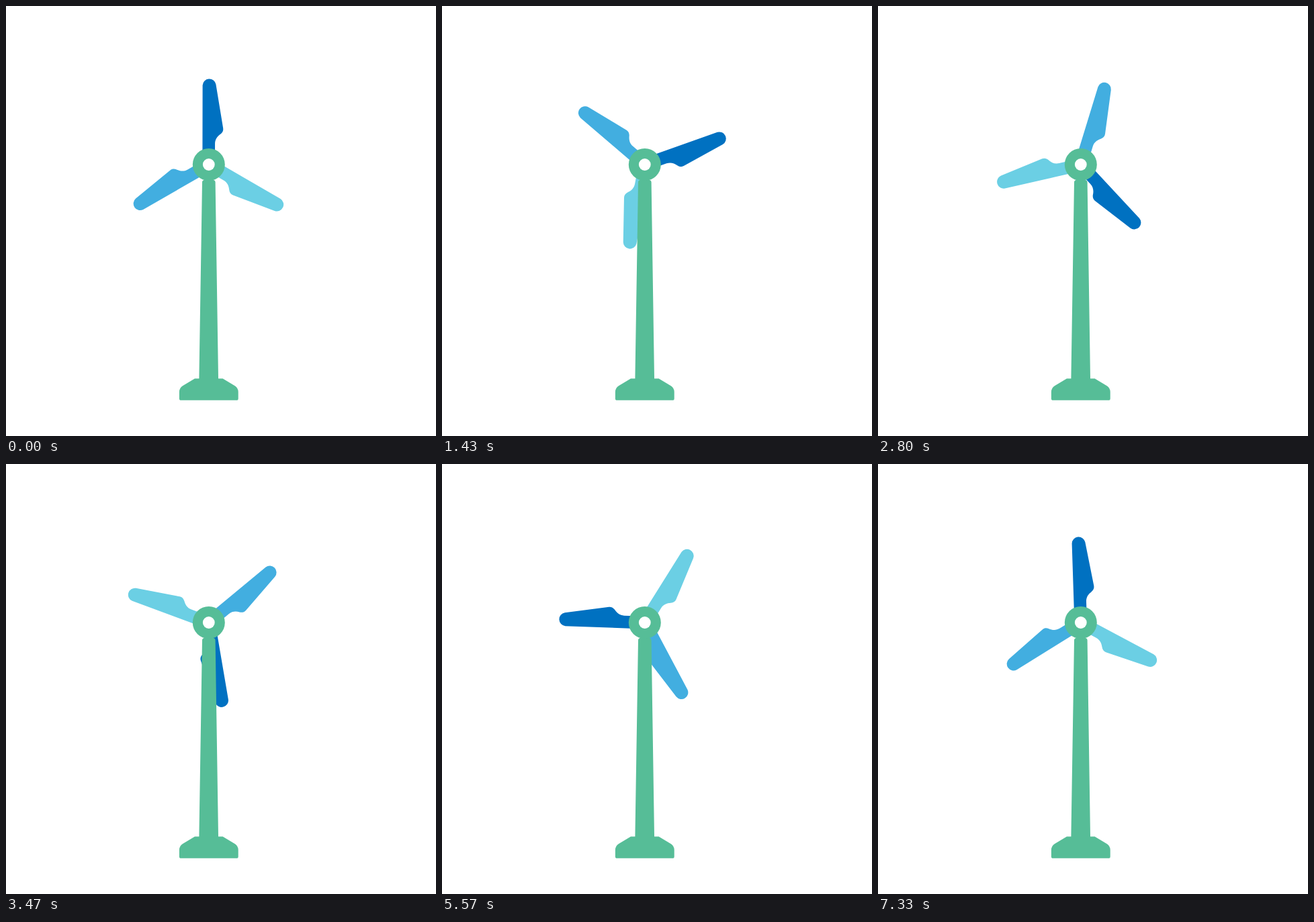
Write an HTML page that moves like this. It is 640 px wide and 640 px high and loops after 7360 ms.

```html
<!DOCTYPE html>
<html lang="en">
<head>
<meta charset="utf-8">
<title>Wind turbine</title>
<style>
  html, body { margin: 0; width: 100%; height: 100%; overflow: hidden; background: #fff; }
  svg { display: block; width: 100%; height: 100%; }
</style>
</head>
<body>
<svg viewBox="0 0 640 640">
  <defs>
    <!-- Blade pointing up, hub at the origin -->
    <path id="blade" d="M-9.4 0V-118A10 10 0 0 1 10.4 -119.4L21.3 -54C21.9 -50.5 20.2 -47.3 17.3 -45.2C12.5 -41.8 9.3 -37.5 9.2 -31V0Z"/>
  </defs>
  <g transform="translate(301.8 236)">
    <g id="rotor">
      <use href="#blade" fill="#0071c1"/>
      <use href="#blade" fill="#6bcfe4" transform="rotate(120)"/>
      <use href="#blade" fill="#42aee0" transform="rotate(240)"/>
    </g>
  </g>
  <g fill="#56bd97">
    <path d="M294.6 259H309Q311.5 259.4 311.6 262L316 554.6H322.6L340.5 565.2Q345.7 568.5 345.7 574.5V584.2Q345.7 586.8 343.1 586.8H260.5Q257.9 586.8 257.9 584.2V574.5Q257.9 568.5 263.1 565.2L281 554.6H287.4L292 262Q292.1 259.4 294.6 259Z"/>
    <circle cx="301.8" cy="236" r="24"/>
  </g>
  <circle cx="301.8" cy="236" r="8.9" fill="#fff"/>
</svg>
<script>
  const LOOP = 7360, POSES = 184;
  const rotor = document.getElementById('rotor');

  // 25 poses per second, shown on a 30 Hz clock rounded to 10 ms
  function poseAt(ms) {
    const tick = Math.floor((Math.floor(ms / 10) * 10 + 5) * 3 / 100);
    return Math.floor((tick * 5 + 2) / 6);
  }

  function draw() {
    const pose = poseAt(performance.now() % LOOP);
    rotor.setAttribute('transform', `rotate(${pose * 360 / POSES + 0.1})`);
    requestAnimationFrame(draw);
  }
  draw();
</script>
</body>
</html>
```
